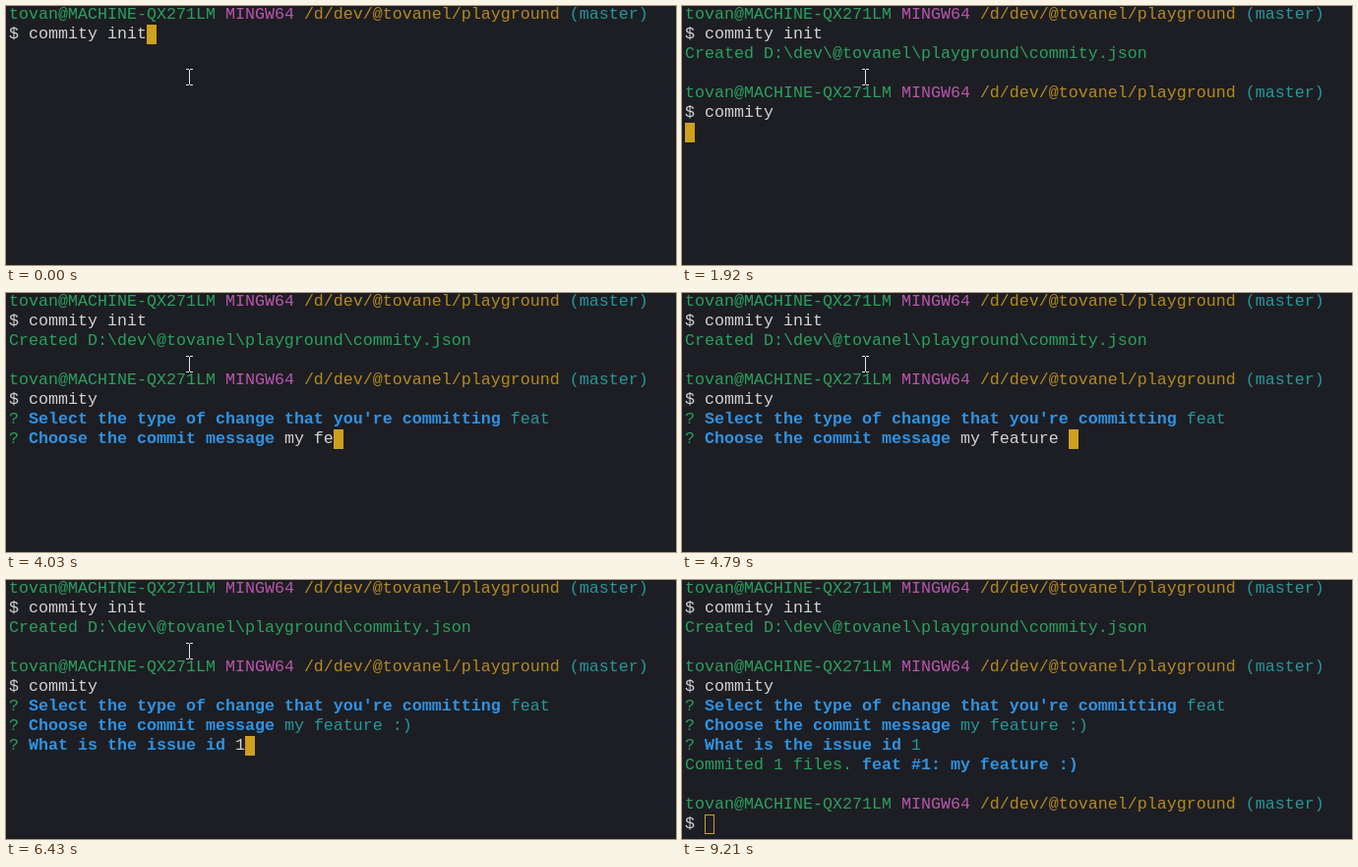
Recreate the animation shown at these times as an HTML page. Size 681 by 264 pixels, loop 9310 ms.

```html
<!DOCTYPE html>
<html lang="en">
<head>
<meta charset="utf-8">
<title>Terminal session</title>
<style>
  html, body { margin: 0; width: 100%; height: 100%; overflow: hidden; background: #1d1e23; }
  pre {
    position: absolute; left: 3px; top: -1px; margin: 0;
    font: 16.667px/20px "Liberation Mono", "Courier New", monospace;
    color: #d2d2d2; white-space: pre;
  }
  b { color: #2f93e4; }
  .green { color: #2ba05f; }
  .pink { color: #bb55b0; }
  .gold { color: #b48a20; }
  .cyan { color: #24989c; }
  i { display: inline-block; width: 10px; height: 20px; vertical-align: top; background: #cda01e; }
  .hollow i { background: none; box-shadow: inset 0 0 0 1px #cda01e; }
  svg { position: absolute; left: 0; top: 0; }
</style>
</head>
<body>
<pre id="term"></pre>
<svg id="mouse" width="7" height="17" fill="none" stroke="#e4e4e4">
  <path d="M0 .5H3M4 .5H7M3.5 1V16M0 16.5H3M4 16.5H7"/>
</svg>
<script>
const LOOP = 9310;
const ink = (name, text) => `<span class="${name}">${text}</span>`;
const ask = text => `${ink('green', '?')} <b>${text}</b> `;
const prompt = `${ink('green', 'tovan@MACHINE-QX271LM')} ${ink('pink', 'MINGW64')} ` +
  `${ink('gold', '/d/dev/@tovanel/playground')} ${ink('cyan', '(master)')}\n$ `;

const screens = [];
let base = prompt;
const show = (time, tail = '', caret = '<i></i>') => screens.push([time, base + tail + caret]);
const type = (text, steps) => steps.forEach(([time, count]) => show(time, text.slice(0, count)));

show(0, 'commity init');
base += 'commity init\n';
show(120);
base += ink('green', 'Created D:\\dev\\@tovanel\\playground\\commity.json') + '\n';
show(520);
base += '\n' + prompt;
show(640);
type('commity', [[1140, 1], [1290, 2], [1410, 3], [1560, 4], [1680, 5], [1800, 7]]);
base += 'commity\n';
show(1920);

base += ask("Select the type of change that you're committing");
show(2420, `(Use arrow keys)\n${ink('cyan', '&gt; feat')}\n  fix\n  chore\n  docs`, '');
base += ink('cyan', 'feat') + '\n' + ask('Choose the commit message');
show(3040);
type('my feature :)', [[3540, 1], [3790, 2], [3910, 3], [4030, 5], [4280, 6], [4400, 7],
  [4520, 8], [4640, 10], [4790, 11], [4940, 12], [5060, 13]]);
base += ink('cyan', 'my feature :)') + '\n' + ask('What is the issue id');
show(5180);
show(6430, '1');
base += ink('cyan', '1') + '\n';
show(6860);
base += `${ink('green', 'Commited 1 files.')} <b>feat #1: my feature :)</b>\n\n${prompt}`;
show(6980);

// Pointer leaves the window near the end
const pointer = [[0, 183, 64], [8600, 390, 150], [8720, 594, 240], [8840, -50, 0]];

const term = document.getElementById('term');
const mouse = document.getElementById('mouse');
const latest = (list, time) => list.findLast(entry => entry[0] <= time);
let shown;

function draw() {
  const time = performance.now() % LOOP;
  const html = latest(screens, time)[1];
  if (html !== shown) term.innerHTML = shown = html;
  term.className = time >= 9210 ? 'hollow' : '';
  const [, x, y] = latest(pointer, time);
  mouse.style.transform = `translate(${x}px, ${y}px)`;
  requestAnimationFrame(draw);
}
draw();
</script>
</body>
</html>
```
